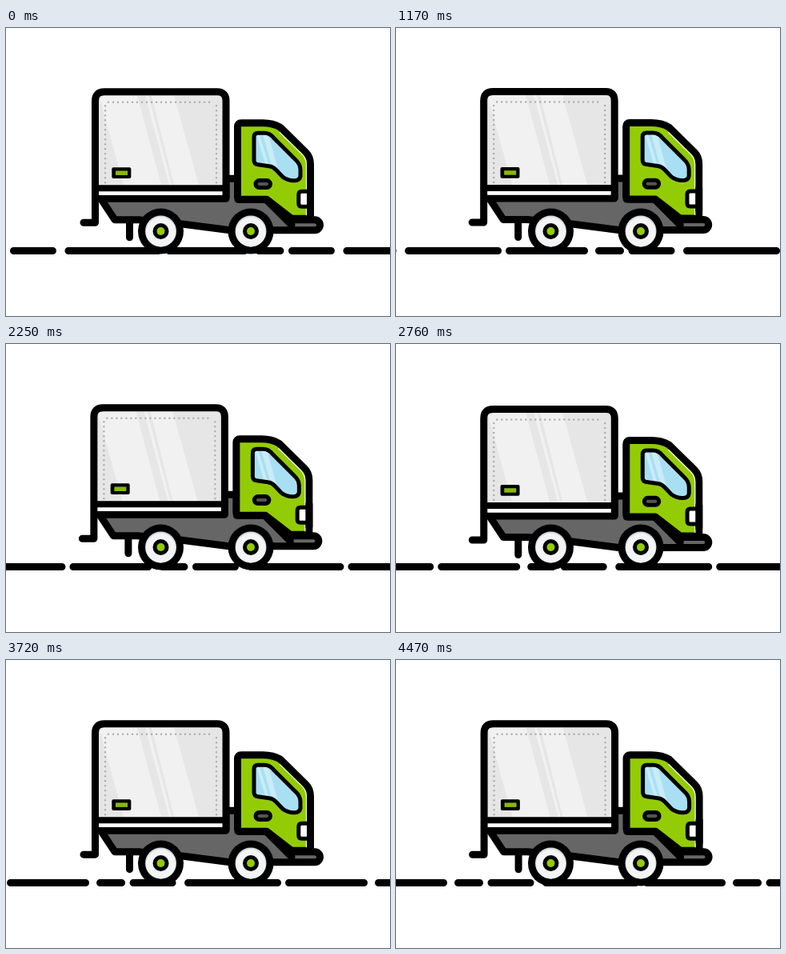
Recreate the animation shown at these times as an HTML page. Size 480 by 360 pixels, loop 4500 ms.

```html
<!DOCTYPE html>
<html lang="en">
<head>
<meta charset="utf-8">
<title>Delivery truck</title>
<style>
  html, body { margin: 0; width: 100%; height: 100%; overflow: hidden; background: #fff; }
  svg { display: block; width: 480px; height: 360px; }
  .line { stroke: #000; stroke-width: 9; stroke-linecap: round; stroke-linejoin: round; }
  .thin { stroke-width: 5; }
  .dots { stroke: #b0b0b0; stroke-width: 2.6; stroke-linecap: round; stroke-dasharray: 0 6; }
  #road { stroke-dasharray: 112 14 94 18 27 14.5 49 19.5; }
</style>
</head>
<body>
<svg viewBox="0 0 480 360" fill="none">
  <defs>
    <g id="wheel">
      <circle r="28.5" fill="#000"/>
      <circle r="19.5" fill="#d6d9dc"/>
      <circle cy="1" r="18.5" fill="#f3f4f5"/>
      <circle r="10" fill="#000"/>
      <circle r="5" fill="#93cc04"/>
    </g>
    <path id="window" d="M310 136Q310 131 315 131H323Q330 131 335 137.500L362 164.500Q368 170 368 177V185Q367 190.500 361 190.500Q353 191 346 186L338 177.500Q334 173 329 172.500L315 170.500Q310 170 310 165Z"/>
    <clipPath id="glass"><use href="#window"/></clipPath>
  </defs>

  <path id="road" class="line" d="M-270 278.500H800"/>

  <g id="body">
    <!-- chassis and bumper -->
    <path class="line" fill="#666" d="M118.500 213L136 239.500H166L222 245L280 252.500H386A6.500 6.500 0 0 0 386 239.500H357L326 214H290V188H275V213Z"/>
    <path class="line" d="M325 214L357 246M154.500 240V261.500"/>

    <!-- cargo box -->
    <path fill="#f1f1f1" d="M112 90L122 80H265L275 90V200H112Z"/>
    <path fill="#e6e6e6" d="M116 84L147 196H116ZM164 84H174L204 196H194ZM178 84H182L210 196H207ZM210 84H270V196H241Z"/>
    <path class="dots" d="M124 97V194M128 92.500H260M263 97V194"/>
    <path fill="#fff" d="M112 200H274V212H112Z"/>
    <path class="line" d="M97 243H111.500V91Q111.500 79.500 123 79.500H264Q275 79.500 275 91V211"/>
    <path class="line" style="stroke-width:8" d="M112 200H274M112 212.800H274"/>
    <rect x="132.300" y="174" width="24" height="13.800" rx="2" fill="#000"/>
    <rect x="137" y="178.200" width="15" height="5.500" fill="#86b90c"/>

    <!-- cab -->
    <path class="line" fill="#93cc04" d="M289.500 211V123Q289.500 118.500 294 118.500H321Q334 118.500 343 124L375 155.500Q380.500 161 380.500 170V238H357L326 214H292Z"/>
    <path stroke="#f4f9e4" stroke-width="1.200" d="M342 130L370 157.500Q375.500 163 375.500 171V234"/>
    <use href="#window" fill="#a9dff2"/>
    <path clip-path="url(#glass)" fill="#c9ecf8" d="M313 133H317L329 173H325ZM321 133H328L341 180H334Z"/>
    <use href="#window" class="line thin"/>
    <rect class="line thin" x="312" y="190.300" width="18.500" height="9" rx="4.500" fill="#555"/>
    <path class="line thin" fill="#fff" d="M378 204H369.500Q365.800 204 365.800 208V219Q365.800 223 369.500 223H378"/>
    <path class="line" d="M380.500 200V228"/>
  </g>

  <use href="#wheel" x="193.500" y="254"/>
  <use href="#wheel" x="306" y="254"/>
</svg>
<script>
  const LOOP = 4500, ROAD_SHIFT = 240, SWAY_PERIOD = 3720;
  const { sin, cos, PI } = Math;
  const road = document.getElementById('road');
  const body = document.getElementById('body');

  function move(part, x, y) {
    part.setAttribute('transform', `translate(${x} ${y})`);
  }

  function draw() {
    const t = performance.now() % LOOP;
    const p = t / LOOP;
    const sway = 2 * PI * t / SWAY_PERIOD;
    // Loose suspension: a slow and a quicker wave on each axis
    const x = -1.2 + 0.7 * cos(sway) + 0.5 * cos(2 * sway);
    const y = 0.5 + 1.2 * cos(4 * PI * (p - 0.14)) - 0.6 * sin(2 * PI * p);

    move(road, -ROAD_SHIFT * p, 0);
    move(body, x, y);
    requestAnimationFrame(draw);
  }
  draw();
</script>
</body>
</html>
```
